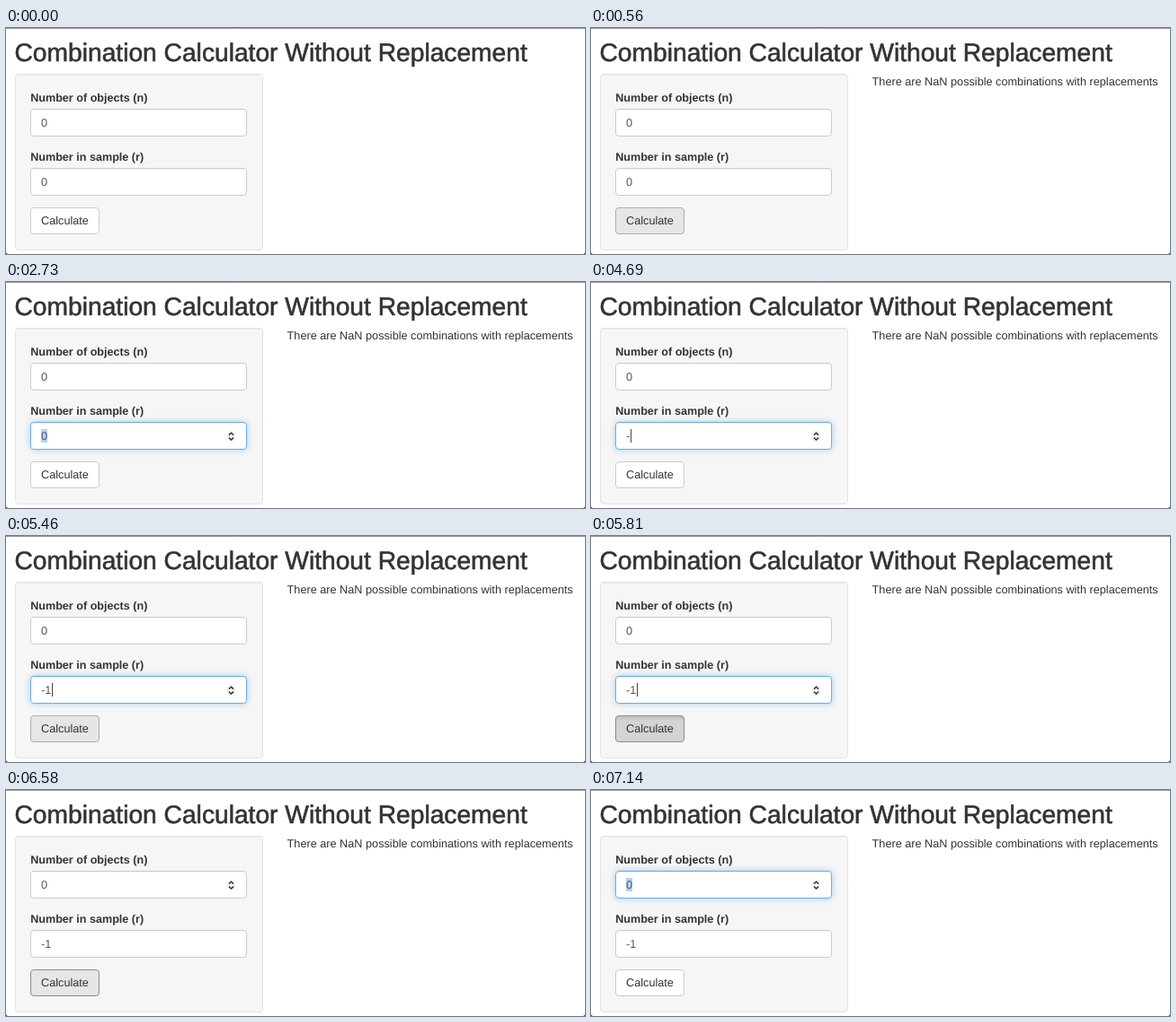
An HTML page for the animation above (8000 ms loop, 644 by 252 pixels).

```html
<!DOCTYPE html>
<html lang="en">
<head>
<meta charset="utf-8">
<title>Combination Calculator</title>
<style>
  html, body { margin: 0; width: 100%; height: 100%; overflow: hidden; background: #222; }
  svg { display: block; }
  text { font: 12.7px "Liberation Sans", Arial, sans-serif; fill: #333; text-rendering: geometricPrecision; }
  .title { font-size: 28.2px; stroke: #333; stroke-width: .6; }
  .label { font-weight: bold; font-size: 12.6px; }
  .value { fill: #555; }
  .box { fill: #fff; }
  .inset { stroke: #000; stroke-opacity: .05; }
  .spinner rect { fill: #f8f8f8; stroke: #ececec; }
  .spinner path { fill: none; stroke: #333; stroke-width: 1.5; }
</style>
</head>
<body>
<svg width="644" height="252" viewBox="0 0 644 252">
  <defs>
    <linearGradient id="pressed" x2="0" y2="1">
      <stop stop-color="#bdbdbd"/>
      <stop offset=".2" stop-color="#d4d4d4"/>
    </linearGradient>
    <g id="spinner" class="spinner">
      <rect x="246.5" y="10.5" width="8" height="11" rx="3.5"/>
      <path d="M248 14.6l2.5-2.4 2.5 2.4M248 17.6l2.5 2.4 2.5-2.4"/>
    </g>
  </defs>
  <rect y="-4" width="644" height="256" rx="2.5" fill="#fff"/>
  <path d="M0 .5H644" stroke="#9a9a9a"/>
  <text class="title" x="9.5" y="37">Combination Calculator Without Replacement</text>
  <rect x="10.5" y="51.5" width="275" height="196" rx="3.5" fill="#f6f6f6" stroke="#e3e3e3"/>
  <path d="M13 52.5H283" class="inset"/>
  <text class="label" x="27.2" y="82">Number of objects (n)</text>
  <text class="label" x="27.2" y="148">Number in sample (r)</text>
  <g id="fields"></g>
  <rect id="ring" x="26" y="199" width="79" height="32" rx="4" fill="none" stroke="#4f93e6" stroke-width="3"/>
  <rect id="button" x="27.5" y="200.5" width="76" height="29" rx="3.5"/>
  <text x="39" y="219">Calculate</text>
  <text id="output" x="312.6" y="64">There are NaN possible combinations with replacements</text>
</svg>
<script>
const LOOP = 8000, STEP = 70;
const $ = id => document.getElementById(id);
const show = (el, on) => el.setAttribute('visibility', on ? 'visible' : 'hidden');
const ramp = (t, start, length) => Math.min(1, Math.max(0, (t - start) / length));
const within = (t, from, to) => t >= from && t < to;

function makeField(top) {
  const g = document.createElementNS('http://www.w3.org/2000/svg', 'g');
  g.setAttribute('transform', `translate(0 ${top})`);
  g.innerHTML = `
    <rect class="box" x="27.5" y=".5" width="240" height="30" rx="3.5"/>
    <path class="inset" d="M30 1.5H265"/>
    <rect class="selection" x="39" y="8" width="7" height="15" fill="#b3d2f9"/>
    <text class="value" x="39" y="20"></text>
    <rect class="caret" y="8" width="1" height="15" fill="#444"/>
    <use href="#spinner"/>`;
  $('fields').append(g);
  const [box, selection, value, caret, spinner] =
    ['.box', '.selection', '.value', '.caret', 'use'].map(s => g.querySelector(s));

  return state => {
    const glow = state.glow;
    box.style.stroke = `color-mix(in srgb, #66afe9 ${glow * 100}%, #ccc)`;
    box.style.filter = glow ? `drop-shadow(0 0 3.6px rgba(102,175,233,${glow * .6}))` : 'none';
    value.textContent = state.text;
    caret.setAttribute('x', { '0': 46, '-': 44, '-1': 51 }[state.text]);
    show(selection, state.selected);
    show(caret, state.caret);
    show(spinner, state.spinner);
  };
}

const drawN = makeField(90), drawR = makeField(156);

const buttonStyles = {
  normal: ['#fff', '#ccc'],
  hover: ['#e6e6e6', '#adadad'],
  focus: ['#e6e6e6', '#8c8c8c'],
  active: ['url(#pressed)', '#8c8c8c']
};
const buttonTimes = [
  [0, 'normal'], [420, 'active'], [490, 'hover'], [2170, 'normal'], [5460, 'hover'],
  [5810, 'active'], [6160, 'hover'], [6510, 'focus'], [7000, 'normal']
];

function draw(t) {
  drawN({
    text: '0',
    glow: ramp(t, 7000, 140),
    selected: t >= 7140,
    caret: within(t, 7000, 7140),
    spinner: t >= 6510
  });
  drawR({
    text: t < 4690 ? '0' : t < 4830 ? '-' : '-1',
    glow: t < 6090 ? ramp(t, 2170, 140) : .4 * (1 - ramp(t, 6090, 140)),
    selected: within(t, 2730, 4690),
    caret: within(t, 2170, 2730) || within(t, 4690, 6090),
    spinner: within(t, 2170, 6090)
  });
  const [fill, stroke] = buttonStyles[buttonTimes.findLast(([start]) => t >= start)[1]];
  $('button').style.fill = fill;
  $('button').style.stroke = stroke;
  show($('ring'), within(t, 420, 490) || within(t, 6090, 6160));
  show($('output'), t >= 490);
}

function tick() {
  const t = performance.now() % LOOP;
  draw(Math.floor(t / STEP) * STEP);
  requestAnimationFrame(tick);
}
tick();
</script>
</body>
</html>
```
